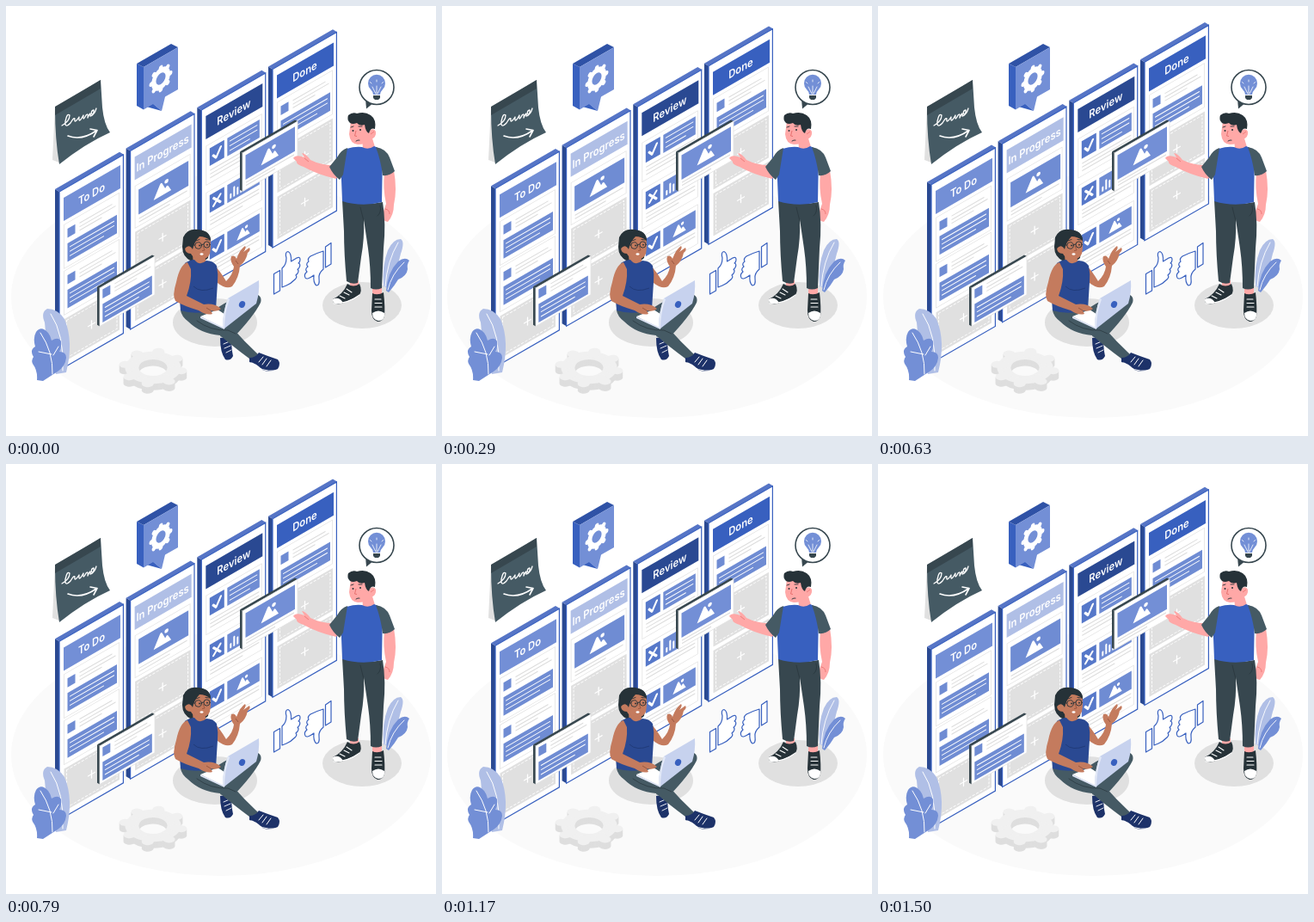
Write an HTML page that moves like this. It is 500 px wide and 500 px high and loops after 1540 ms.

```html
<!DOCTYPE html>
<html lang="en">
<head>
<meta charset="utf-8">
<title>Kanban board</title>
<style>
  html, body { margin: 0; width: 100%; height: 100%; overflow: hidden; background: #fff; }
  svg { display: block; width: 100vw; height: 100vh; }
  text { font: 600 13px Inter, sans-serif; fill: #fff; text-anchor: middle; }
  .boards { animation: float 1540ms linear infinite; }
  @keyframes float { 50% { transform: translateY(-10px); } }
  .base { fill: #3860bf; }
  .deep { fill: #2a4992; }
  .navy { fill: #1d3269; }
  .mid { fill: #6f8cd3; }
  .soft { fill: #738fd6; }
  .pale { fill: #b0bfe6; }
  .dark { fill: #37474f; }
  .slate { fill: #455a64; }
  .ink { fill: #263238; }
  .skin { fill: #ffa8a7; }
  .tan { fill: #c47b5e; }
  .white { fill: #fff; }
  .line { fill: none; stroke: #fff; stroke-linecap: round; stroke-linejoin: round; }
  .thin { fill: none; stroke: #263238; stroke-linecap: round; stroke-width: .9; }
  .rule { fill: none; stroke: #dcdcdc; stroke-width: 1.2; }
  .paper { fill: #fff; stroke: #e3e3e3; stroke-width: .8; }
  .outline { fill: #fff; stroke: #3860bf; stroke-width: 1.2; stroke-linejoin: round; }
</style>
</head>
<body>
<svg viewBox="0 0 500 500" xmlns="http://www.w3.org/2000/svg">
<defs>
  <g id="frame">
    <path class="deep" d="M0 0L-5-3V204.5L0 207.5Z"/>
    <path fill="#5675c6" d="M0 0L-5-3L70-46.3L75-43.3Z"/>
    <path class="white" stroke="#3860bf" stroke-width="1.2" d="M0 0L74.4-42.9V164.6L0 207.5Z"/>
  </g>
  <g id="textblock">
    <path class="rule" d="M14 1.5H52M14 5.8H56M14 10H40"/>
    <rect class="mid" width="9" height="10.5"/>
    <rect class="mid" y="17" width="57.5" height="21.5"/>
    <path class="line" stroke-width="1.1" d="M3 22.5H54M3 27.7H54M3 33H42"/>
  </g>
  <g id="note">
    <rect class="paper" x="5.5" y="41.5" width="64" height="51"/>
    <use href="#textblock" x="9.5" y="48.5"/>
  </g>
  <g id="slot">
    <rect x="5.5" width="64.5" height="49.5" fill="#e0e0e0"/>
    <rect x="8.5" y="3" width="58.5" height="43.5" class="line" stroke-width=".9" stroke-dasharray="2.2 2.2"/>
    <path class="line" stroke-width="1.3" d="M33.5 24.5H41.5M37.5 20V29"/>
  </g>
  <g id="peaks" class="white">
    <path d="M-10 7L-2.5-7Q-1.3-9 0-7L3.5 1L5-.8Q6-1.6 7 0L10.5 7Z"/>
    <circle cx="5" cy="-6.5" r="2.3"/>
  </g>
  <g id="card">
    <rect class="paper" x="5.5" y="45" width="64.5" height="45.5"/>
    <rect class="base" x="9.5" y="50" width="17" height="20.5" fill-opacity=".85"/>
    <rect class="mid" x="30" y="50" width="37.5" height="21"/>
    <path class="rule" d="M10 76H67M10 80.3H67M10 84.6H48"/>
  </g>
  <path id="check" class="line" stroke-width="2.6" d="M13.5 60.5L17 65L22.5 55.5"/>
  <g id="cog" fill="none" stroke="currentColor">
    <circle r="24.5" stroke-width="16"/>
    <path stroke-width="14" stroke-linecap="round" d="M26 0H33M-26 0H-33M0 26V33M0-26V-33M18 18L23.500 23.500M-18 18L-23.500 23.500M18-18L23.500-23.500M-18-18L-23.500-23.500"/>
  </g>
  <use id="wheel" href="#cog" transform="scale(1 .577) rotate(11)"/>
</defs>

<ellipse cx="250" cy="338" rx="244" ry="141" fill="#fafafa"/>
<ellipse cx="243" cy="368" rx="49" ry="28" fill="#e0e0e0"/>
<ellipse cx="414" cy="348" rx="46" ry="27" fill="#e0e0e0"/>

<g class="boards">
  <g transform="translate(62 216)">
    <use href="#frame"/>
    <g transform="matrix(1 -.577 0 1 0 0)">
      <rect class="soft" x="5" y="10" width="66" height="27"/>
      <text transform="translate(37.5 28.7) scale(.866 1)">To Do</text>
      <use href="#note"/>
      <use href="#note" y="54"/>
      <use href="#slot" y="151.5"/>
    </g>
  </g>
  <g transform="translate(144.6 168.5)">
    <use href="#frame"/>
    <g transform="matrix(1 -.577 0 1 0 0)">
      <rect class="pale" x="5" y="10" width="66" height="27"/>
      <text transform="translate(37.5 28.7) scale(.866 1)">In Progress</text>
      <rect class="paper" x="5.5" y="44" width="64" height="49"/>
      <rect class="mid" x="9.5" y="50.5" width="58" height="29"/>
      <use href="#peaks" x="37" y="66"/>
      <path class="rule" d="M10 84.5H66M10 88.5H46"/>
      <use href="#slot" y="97.5"/>
      <use href="#slot" y="151.5"/>
    </g>
  </g>
  <g transform="translate(227.3 121)">
    <use href="#frame"/>
    <g transform="matrix(1 -.577 0 1 0 0)">
      <rect class="deep" x="5" y="10" width="66" height="27"/>
      <text transform="translate(37.5 28.7) scale(.866 1)">Review</text>
      <use href="#card"/>
      <use href="#check"/>
      <path class="line" stroke-width="1.1" d="M33 55H64.5M33 60.5H64.5M33 66H56"/>
      <g transform="translate(0 54.5)">
        <use href="#card"/>
        <path class="line" stroke-width="2.6" d="M14 56L22 65M22 56L14 65"/>
        <path class="line" stroke-width="2" d="M34 67V63M38 67V57M42 67V60M46 67V54M50 67V58"/>
      </g>
      <g transform="translate(0 109)">
        <use href="#card"/>
        <use href="#check"/>
        <use href="#peaks" transform="translate(48.5 61.5) scale(.75)"/>
      </g>
    </g>
  </g>
  <g transform="translate(310 73.5)">
    <use href="#frame"/>
    <g transform="matrix(1 -.577 0 1 0 0)">
      <rect class="base" x="5" y="10" width="66" height="27"/>
      <text transform="translate(37.5 28.7) scale(.866 1)">Done</text>
      <use href="#note"/>
      <use href="#slot" y="97.5"/>
      <use href="#slot" y="151.5"/>
    </g>
  </g>
</g>

<!-- loose cards -->
<g transform="translate(109 328)">
  <path class="dark" d="M0 0L-3-1.7V42.800L0 44.5Z"/>
  <path class="dark" d="M0 0L-3-1.7L61-38.6L64-37Z"/>
  <g transform="matrix(1 -.577 0 1 0 0)">
    <rect class="paper" width="64" height="44.5"/>
    <use href="#textblock" x="3.3" y="3.5"/>
  </g>
</g>
<g transform="translate(275 171)">
  <path class="dark" d="M0 0L-3-1.7V42.800L0 44.5Z"/>
  <path class="dark" d="M0 0L-3-1.7L61-38.6L64-37Z"/>
  <g transform="matrix(1 -.577 0 1 0 0)">
    <rect class="paper" width="64" height="44.5"/>
    <rect class="soft" x="3.5" y="4.5" width="57.5" height="28.5"/>
    <use href="#peaks" x="31.5" y="20"/>
    <path class="rule" d="M4 36.5H60M4 40H38"/>
  </g>
</g>

<!-- gear bubble -->
<path class="base" d="M160 71L152 67V116L160 120.5Z"/>
<path fill="#2f52a6" d="M160 71L152 67L192 44L200 48Z"/>
<path class="base" d="M163 117L171 113.5L181 122Z"/>
<path class="soft" d="M160 71L200 48V97L185 105.5L181 122L171 114L160 120.5Z"/>
<g color="#fff" transform="matrix(.866 -.5 0 1 180 84.5) scale(.39)"><use href="#cog"/></g>

<!-- signed note -->
<path fill="#e0e0e0" d="M57 117L54 179L62 182L80 120Z"/>
<path class="slate" d="M57 119L110 86L112 118Q114 138 121 147Q92 160 62 184Q57 155 57 119Z"/>
<path class="dark" d="M57 117L110 86V96L57 127Z"/>
<path class="line" stroke-width="1.3" d="M65 139Q74 134 74 127Q71 124 69 134Q68 143 75 136Q79 129 80 131Q79 138 85 129Q84 138 90 127Q89 135 93 127Q96 124 95 130Q99 121 98 128Q103 127 102 121Q98 122 100 126Q103 126 105 119"/>
<path class="line" stroke-width="1.6" d="M72 151Q88 157 105 145M98 143L106 144.5L102 152"/>

<!-- idea bubble -->
<path fill="#37474f" d="M418 108L419 119.5L428 112Z"/>
<circle cx="431" cy="94.5" r="20" fill="#fff" stroke="#37474f" stroke-width="1.6"/>
<path class="soft" d="M427 103Q427 100 424 97A10 10 0 1 1 438 97Q435 100 435 103Z"/>
<path class="dark" d="M427 104H435V107L433 109H429L427 107Z"/>
<path class="line" stroke-width=".8" d="M431 102V93M430 102L426 94M432 102L436 94M431 88V86M425 90L423.5 88.5M437 90L438.5 88.5"/>

<!-- thumbs -->
<path class="outline" d="M311.5 311.5L318.5 307.5V331L311.5 335Z"/>
<path class="outline" d="M321 305Q326 301 326 293Q324 286 328 285.5Q332 287 331.5 297L338 293Q342 291 342 295Q342 298 340 299Q343 300 341 304Q340 306 339 306Q341 308 339 311L337 313Q339 315 336 318Q331 323 326 325L321 327Z"/>
<path class="outline" d="M371.5 280L378 275.5V300L371.5 304Z"/>
<path class="outline" d="M369 285Q362 287 354 291Q350 294 352 297Q348 300 351 303Q347 306 350 309Q346 312 348 316Q350 319 358 313Q357 322 361 325Q365 325 364 317Q363 311 369 306Z"/>

<!-- plants -->
<path class="pale" d="M70 426Q79 390 68 364Q60 352 48 352Q40 356 45 368L47 390L58 428Z"/>
<path class="line" stroke-width="1" d="M52 358Q68 382 66 424"/>
<path class="soft" d="M36 435Q37 424 31 416Q29 412 32 408Q27 400 34 396Q31 386 35 379Q41 371 49 380Q52 384 53 389Q61 384 64 390Q65 397 62 402Q70 402 70 409Q69 419 60 425L43 436Z"/>
<path class="line" stroke-width="1" d="M40 380Q55 402 54 428M38 402L53 405M55 406L61 396"/>
<path class="pale" d="M439 326Q437 302 444 284Q450 271 459 271Q464 274 459 288Q456 303 444 328Z"/>
<path class="line" stroke-width=".9" d="M456 275Q443 297 441 326"/>
<path class="soft" d="M442 331Q444 309 456 297Q464 291 469 296Q466 300 467 306Q466 314 456 318Q452 325 445 333Z"/>
<path class="line" stroke-width=".9" d="M463 298Q448 312 444 330"/>

<!-- floor gear -->
<g color="#dedede">
  <use href="#wheel" x="171" y="428"/>
  <use href="#wheel" x="171" y="426"/>
  <use href="#wheel" x="171" y="424"/>
  <use href="#wheel" x="171" y="422"/>
</g>
<g color="#f0f0f0"><use href="#wheel" x="171" y="420.5"/></g>

<!-- man -->
<path class="skin" d="M440 194L451 191Q455 214 451 231Q451 243 444 251Q436 250 438 241L442 230Q438 212 440 194Z"/>
<path class="skin" d="M400 319H410V330H400ZM426 326H437V338H426Z"/>
<path class="dark" d="M391 226Q414 233 438 228Q442 252 439 282L437 328Q430 331 424 328Q424 303 421 282L416 248Q417 270 413 292L409 322Q402 324 396 320Q393 288 393 262Z"/>
<path class="thin" d="M416 250L412 234M435 232Q437 240 432 244" stroke-opacity=".7"/>
<path class="ink" d="M397 323Q404 328 411 323Q415 332 410 337Q400 342 390 346Q379 348 380 341Q392 335 397 323Z"/>
<path class="white" d="M380 341Q387 337 392 345Q381 348 380 343Z"/>
<path class="line" stroke-width="1.1" d="M393 333L399 336M396 329L402 333M388 337L394 340M381 346Q398 346 411 336"/>
<path class="ink" d="M426 334Q432 337 439 333Q441 350 440 361Q438 367 432 367Q425 365 425 354Z"/>
<path class="white" d="M426 357Q433 352 440 357Q441 366 433 366Q426 365 426 357Z"/>
<path class="line" stroke-width="1.1" d="M429 341H436M429 345.5H437M429 350H437"/>
<path class="skin" d="M414 156L415 165Q420 172 429 164L426 154Z"/>
<path class="skin" d="M384 185Q368 186 354 179Q348 171 344 171L347 176Q337 172 334 177Q336 179 338 181Q337 184 346 187Q362 196 384 201L390 192Z"/>
<path class="base" d="M396 166Q406 163 414 164Q421 168 428 163Q436 165 438 173L437 228Q414 234 391 227L389 178Z"/>
<path class="slate" d="M397 165Q390 167 385 176L376 187Q380 196 388 202L392 196Z"/>
<path class="slate" d="M430 164Q442 166 446 176L452 192Q446 198 438 197Q436 180 430 164Z"/>
<path class="skin" d="M401 134L399 149Q400 160 409 161Q418 161 424 155Q431 153 430 146Q428 141 422 145L420 135Z"/>
<path class="ink" d="M400 136Q396 132 398 127Q403 123 408 125Q417 122 424 127Q431 132 429 143Q424 141 422 148Q418 146 417 138Q411 140 408 136Q403 138 400 136Z"/>
<g class="ink"><circle cx="403.5" cy="145" r="1"/><circle cx="412" cy="144" r="1"/></g>
<path class="thin" d="M401 141L404 140M410 140L414 140M407 157Q409 155.500 411 156"/>
<path fill="none" stroke="#e8716f" d="M407 145L405.5 151L408 151.5"/>
<path fill="none" stroke="#e8716f" stroke-width=".8" d="M424 149L428 146M347 177L352 181M441 236Q446 237 446 242"/>

<!-- woman -->
<path class="ink" d="M206 269Q211 258 224 260Q237 261 238 272L236 284L235 293Q228 300 216 297Q205 292 205 280Z"/>
<path class="tan" d="M241 300Q249 308 256 320Q264 312 265 303Q260 296 262 291Q266 289 268 294Q272 283 278 279Q280 281 276 286L283 281Q285 284 281 287Q279 297 272 302Q271 316 263 326Q256 330 246 322L238 312Z"/>
<path class="navy" d="M249 386L262 384Q262 398 264 407Q261 413 255 411Q249 403 249 386Z"/>
<path class="line" stroke-width=".9" d="M253 393L260 390M254 398L261 395M256 403L262 400"/>
<path class="slate" d="M244 352Q265 338 285 334Q299 335 296 345Q288 361 264 386Q257 388 249 384L258 362Z"/>
<path class="slate" d="M203 354Q212 348 246 355L262 373Q277 390 293 405Q289 411 283 410Q264 396 249 383Q226 381 212 367Q204 361 203 354Z"/>
<path class="thin" d="M222 366Q238 378 258 377L267 381" stroke-opacity=".7"/>
<path class="navy" d="M283 409Q290 409 294 403Q304 407 316 411Q320 416 316 422Q306 427 298 423Q291 415 283 414Z"/>
<path class="line" stroke-width="1" d="M294 414L299 408M298 417L303 410M303 419L308 412M286 415Q297 426 313 424"/>
<path class="tan" d="M217 290L218 300Q226 306 233 300L231 290Z"/>
<path class="deep" d="M208 299Q214 295 219 295Q225 303 233 296Q241 296 245 302Q247 312 246 321L244 353Q222 360 203 354L201 330Z"/>
<path fill="none" stroke="#1f3873" stroke-width=".8" d="M218 326Q226 334 241 328"/>
<path class="white" d="M226 361L246 353L260 362L254 375Z"/>
<path fill="#dfe5f5" d="M226 361L254 374V376L226 363Z"/>
<path class="tan" d="M211 298Q202 301 198 321Q193 337 197 343Q207 349 224 354Q233 360 240 358L238 354Q246 356 250 352Q242 345 230 347L210 337Q216 321 215 306Z"/>
<path fill="#c7d2ee" d="M258 340L294 319Q295 333 291 346L254 375L252 373Q252 356 258 340Z"/>
<path fill="#e3e9f7" d="M254 375L252 373Q252 356 258 340L260 341Q254 357 254 375Z"/>
<ellipse class="base" cx="274.5" cy="347" rx="3.5" ry="4" transform="rotate(25 274.5 347)"/>
<path class="tan" d="M219 269Q228 264 237 269Q239 279 237 288Q234 295 226 295Q217 293 215 288Q208 288 208 281Q211 276 216 280Z"/>
<path class="ink" d="M207 271Q213 259 226 261Q238 263 238 273Q232 268 225 268Q219 274 217 283Q213 276 208 282Z"/>
<g class="thin"><circle cx="223.5" cy="278.5" r="3.800"/><circle cx="233.5" cy="277.5" r="3.600"/><path d="M227.500 277.5L230 277M220 278L214 278M221 273L225 271.5M232 271.5L236 272"/></g>
<g class="ink"><circle cx="225" cy="278.5" r=".9"/><circle cx="234" cy="277.7" r=".9"/></g>
<path fill="none" stroke="#8e4f3a" stroke-width=".8" d="M229 279L231 284L228 284.5M267 296L270 300M238 354L233 351"/>
<ellipse class="white" cx="227.5" cy="288.5" rx="2" ry="1.2"/>
</svg>
</body>
</html>
```
